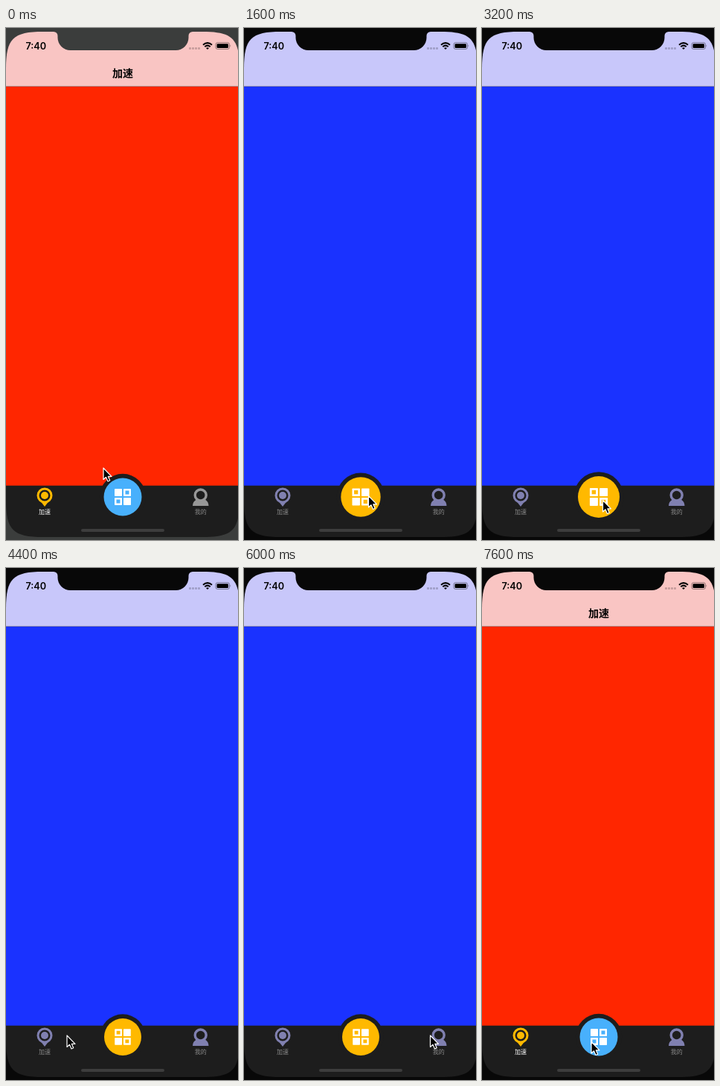
An HTML page for the animation above (8 s loop, 312x690 px).

```html
<!DOCTYPE html>
<html lang="zh-CN">
<head>
<meta charset="utf-8">
<title>Tab bar demo</title>
<style>
  html, body { margin: 0; width: 100%; height: 100%; overflow: hidden; background: #080808; }
  svg { display: block; width: 312px; height: 690px; }
  text { font-family: "Noto Sans CJK SC", "Noto Sans CJK", "Noto Sans CJK JP", sans-serif; text-anchor: middle; }
  .time { font: 600 12.7px Inter, Roboto, sans-serif; }
  .title { font-size: 14px; font-weight: 700; }
  .label { font-size: 8px; font-weight: 500; fill: #8a8a8a; }
  .tab { color: #8080b0; }
  .clean .tab { color: #979797; }
  .tab.on, .clean .tab.on { color: #ffb900; }
  .on .label { fill: #fff; }
</style>
</head>
<body>
<svg id="stage" viewBox="0 0 312 690">
  <defs>
    <clipPath id="screen">
      <path d="M0 55C0 14.200 9.200 5 50 5H264C304.800 5 314 14.200 314 55V636C314 676.800 304.800 686 264 686H50C9.200 686 0 676.800 0 636Z"/>
    </clipPath>
  </defs>
  <rect id="bezel" width="312" height="690"/>
  <g clip-path="url(#screen)">
    <rect id="page" y="78" width="314" height="540"/>
    <rect id="nav" width="314" height="79"/>
    <rect y="78" width="314" height="1" fill="#000" opacity=".3"/>
    <rect y="616.700" width="314" height="74" fill="#1d1d1d"/>
    <rect x="101" y="675" width="112" height="4" rx="2" fill="#3d3d3d"/>
  </g>
  <path id="notch" d="M64 0V5A5.500 5.500 0 0 1 69.500 10.500V13A17 17 0 0 0 86.500 30H228.500A17 17 0 0 0 245.500 13V10.500A5.500 5.500 0 0 1 251 5V0Z"/>

  <text class="time" x="40.300" y="28.600">7:40</text>
  <g fill="#000" fill-opacity=".2">
    <rect x="246" y="26" width="3" height="3" rx="1"/>
    <rect x="250" y="26" width="3" height="3" rx="1"/>
    <rect x="254" y="26" width="3" height="3" rx="1"/>
    <rect x="258" y="26" width="3" height="3" rx="1"/>
  </g>
  <g fill="none" stroke="#000" stroke-width="2">
    <path d="M265 22.800Q271 17.500 277 22.800M267.300 25.300Q271 22 274.700 25.300"/>
    <path d="M269 27L271 29L273 27Q271 25.300 269 27Z" fill="#000" stroke="none"/>
  </g>
  <rect x="282" y="19.700" width="18.500" height="8.800" rx="2.500" fill="none" stroke="#000" stroke-opacity=".4"/>
  <rect x="283.500" y="21.200" width="15.500" height="5.800" rx="1.300"/>
  <path d="M301.500 22.500q1.500 1.500 0 3z" opacity=".5"/>
  <text class="title" id="title" x="157" y="65.500"></text>

  <g class="tab" id="speed">
    <path d="M45.500 636.500L52 645L58.500 636.500Z" fill="currentColor"/>
    <circle cx="52" cy="630" r="9" fill="#1d1d1d" stroke="currentColor" stroke-width="3"/>
    <circle cx="52" cy="630" r="5" fill="currentColor"/>
    <text class="label" x="52" y="654.600">加速</text>
  </g>
  <g class="tab" id="mine">
    <path d="M251 644Q251 638 257 635H267Q272.500 638 272.500 644Z" fill="currentColor"/>
    <circle cx="261.700" cy="629.500" r="7.500" fill="#1d1d1d" stroke="currentColor" stroke-width="3.400"/>
    <text class="label" x="261.700" y="654.600">我的</text>
  </g>

  <circle id="ring" cx="157" cy="632" fill="#1d1d1d"/>
  <circle id="disc" cx="157" cy="632"/>
  <g id="grid">
    <g fill="#fff">
      <rect x="-11" y="-11" width="10" height="10" rx=".7"/>
      <rect x="1" y="-11" width="10" height="10" rx=".7"/>
      <rect x="-11" y="1" width="10" height="10" rx=".7"/>
      <rect x="1" y="1" width="10" height="10" rx=".7"/>
    </g>
    <path id="holes"/>
  </g>
  <path id="cursor" d="M0 0V15.500L3.500 12.300L6 18L8.700 16.800L6.300 11.300H11Z"
        fill="#000" stroke="#fff" stroke-width="1.200" stroke-linejoin="round"/>
</svg>
<script>
  const $ = id => document.getElementById(id);
  const STEP = 400;

  const pages = {
    speed: { color: '#ff2600', nav: '#f9c5c3', title: '加速' },
    home:  { color: '#1a32ff', nav: '#c8c7fa', title: '' },
    mine:  { color: '#ff2600', nav: '#f9c5c3', title: '我的' }
  };

  // One pass of the gesture: page, pointer x, pointer y, button radius.
  const poses = [
    ['speed', 131, 593, 25.5], ['speed', 142, 612, 25.5], ['speed', 159, 635, 25.5],
    ['home', 162.5, 636.5, 28], ['home', 250.5, 630, 25],
    ['mine', 257, 633, 25.5], ['mine', 250, 633, 25.5], ['mine', 200, 633, 25.5],
    ['home', 167.5, 630.5, 26.7], ['home', 82, 630, 25], ['home', 56, 632, 25],
    ['speed', 51, 634, 25.5], ['speed', 147, 638.5, 25.5], ['speed', 139, 616, 25.5]
  ];
  const order = [0, 2, 4, 6, 8, 10, 12, 1, 3, 5, 7, 9, 11, 13, 2, 4, 6, 8, 10, 12];

  const hole = (x, y) => `M${x - 2.5} ${y - 2.5}h5v5h-5z`;

  function show(n) {
    const [name, x, y, r] = poses[n];
    const page = pages[name];
    const home = name === 'home';
    const clean = n < 3;
    const bezel = clean ? '#3b3d3c' : '#080808';
    const accent = home ? '#ffb900' : '#48b0fc';

    $('stage').classList.toggle('clean', clean);
    $('bezel').setAttribute('fill', bezel);
    $('notch').setAttribute('fill', bezel);
    $('page').setAttribute('fill', page.color);
    $('nav').setAttribute('fill', page.nav);
    $('title').textContent = page.title;
    for (const id of ['speed', 'mine']) $(id).classList.toggle('on', id === name);

    $('ring').setAttribute('r', r + 5.7);
    $('disc').setAttribute('r', r);
    $('disc').setAttribute('fill', accent);
    $('grid').setAttribute('transform', `translate(157 632) scale(${r / 25.5})`);
    $('holes').setAttribute('fill', accent);
    $('holes').setAttribute('d', home ? hole(-6, -6) + hole(6, 6) : hole(6, -6) + hole(-6, 6));
    $('cursor').setAttribute('transform', `translate(${x} ${y})`);
  }

  let last = -1;
  function tick(now) {
    const i = Math.floor(now / STEP) % order.length;
    if (i !== last) show(order[last = i]);
    requestAnimationFrame(tick);
  }
  tick(performance.now());
</script>
</body>
</html>
```
